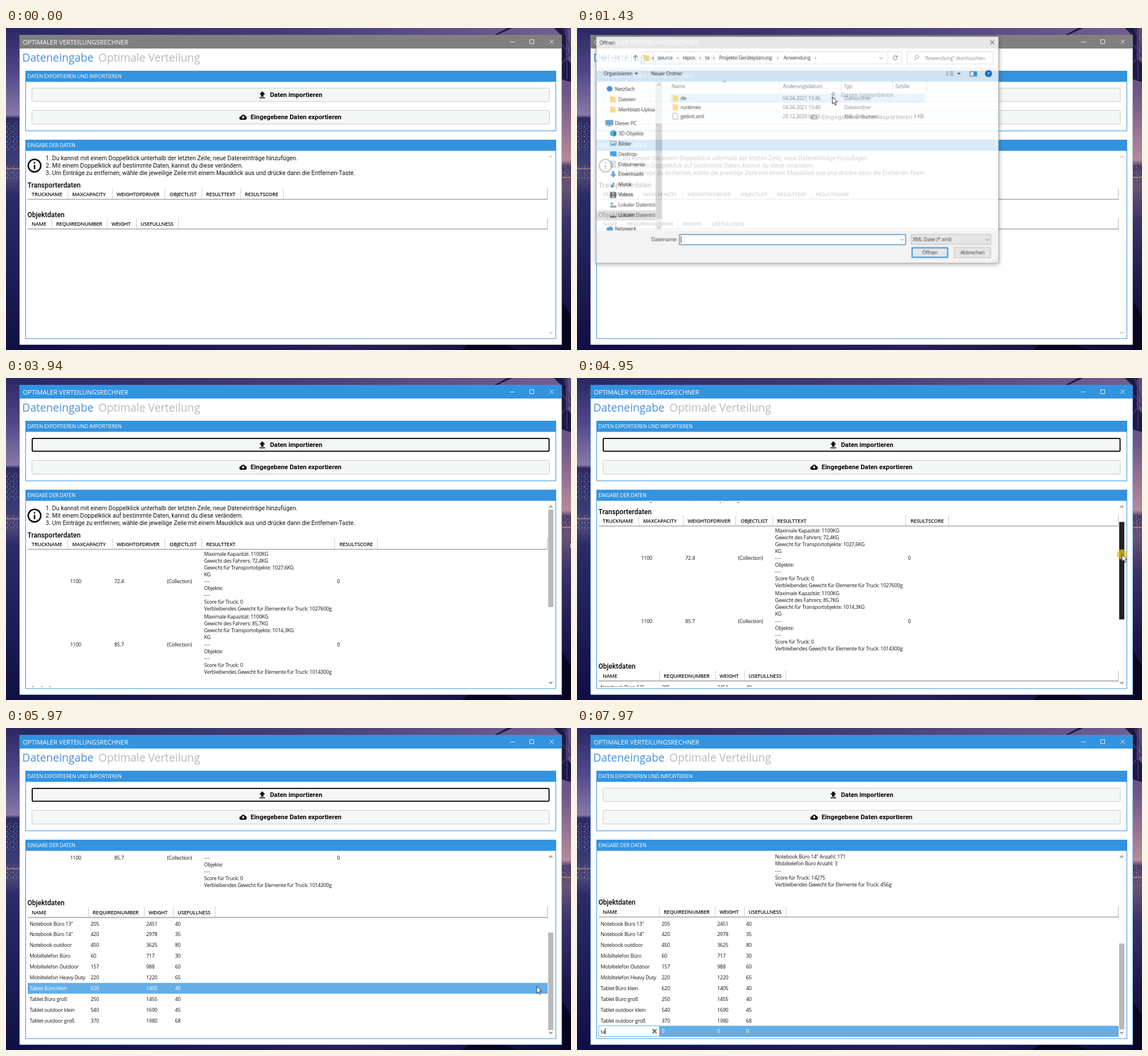
Animation, 991 px wide and 565 px high, one loop 8 s. Source, as an HTML page:

```html
<!DOCTYPE html>
<html lang="de">
<head>
<meta charset="utf-8">
<title>Optimaler Verteilungsrechner</title>
<style>
html, body { margin: 0; width: 100%; height: 100%; overflow: hidden; background: #14113f; }
svg { display: block; width: 991px; height: 565px; }
text { font: 8.9px "Open Sans", "Noto Sans", sans-serif; letter-spacing: -.2px; fill: #111; white-space: pre; }
text.app { font-size: 11.15px; letter-spacing: 0; fill: #fff; }
text.tab { font-size: 19.2px; letter-spacing: 0; fill: #4a90d9; }
text.off { fill: #b9b9b9; }
text.box { font-size: 9px; fill: #fff; }
text.btn { font: 700 11.3px Roboto, sans-serif; letter-spacing: 0; fill: #000; }
text.tip { font: 10.55px Roboto, sans-serif; letter-spacing: 0; fill: #111; }
text.cap { font: 500 12px Roboto, sans-serif; letter-spacing: 0; fill: #000; }
text.col { font-weight: 600; font-size: 9px; }
text.dash { letter-spacing: .6px; }
text.dim { fill: #6d6d6d; }
text.hdr { fill: #56677c; }
text.end { text-anchor: end; }
text.mid { text-anchor: middle; }
text.inv { fill: #fff; }
.ln { fill: none; stroke-width: 1; }

/* 8 s loop: 1 % = 80 ms */
.step { animation: 8s step-end infinite; }
.flow { animation: 8s linear infinite; }
.row rect { fill: #64aee8; opacity: 0; }
.row.hot rect { animation: hot 8s var(--at) infinite; }
.row.hot text { animation: lit 8s var(--at) infinite; }
@keyframes hot { 0%, 1.8% { opacity: 1 } 2.2%, 100% { opacity: 0 } }
@keyframes lit { 0%, 1.8% { fill: #fff } 2.2%, 100% { fill: #111 } }

@keyframes active { 0% { fill: #808080 } 10.875% { fill: #3393df } 13.875% { fill: #808080 } 39.4%, 100% { fill: #3393df } }
@keyframes press { 0% { fill: #f5f7f7 } 8.1% { fill: #e6e8e8 } 10.875% { fill: #d4d6d6 } 13.875% { fill: #e6e8e8 } 17%, 100% { fill: #f5f7f7 } }
@keyframes focus { 0% { opacity: 0 } 39.4% { opacity: 1 } 85.625%, 100% { opacity: 0 } }
@keyframes empty { 0% { opacity: 1 } 41.25%, 100% { opacity: 0 } }
@keyframes full { 0% { opacity: 0 } 41.25%, 100% { opacity: 1 } }
@keyframes trucks { 0% { opacity: 1 } 88%, 100% { opacity: 0 } }
@keyframes late { 0% { opacity: 0 } 88%, 100% { opacity: 1 } }
@keyframes nudge { 0% { transform: none } 88%, 100% { transform: translateY(-.8px) } }
@keyframes added { 0% { opacity: 0 } 85.625%, 100% { opacity: 1 } }
@keyframes arrows { 0% { fill: #dcdcdc } 41.25%, 100% { fill: #b0b0a8 } }
@keyframes scroll {
  0%, 59.375% { transform: translateY(0) } 66% { transform: translateY(-108px) }
  69.75%, 100% { transform: translateY(-240px) }
}
@keyframes thumb {
  0%, 41.24% { y: 231px; height: 171px; opacity: 0; fill: #b9b9b9 }
  41.25%, 52.5% { opacity: 1; fill: #b9b9b9 }
  53.75%, 59.37% { fill: #8c8c8c }
  59.375% { y: 231px; fill: #232323 }
  66% { y: 288px }
  69.7% { fill: #232323 }
  69.75% { y: 359px; fill: #b9b9b9 }
  85.62% { y: 359px; height: 171px }
  85.625%, 87.99% { y: 353px; height: 166px }
  88%, 100% { y: 378px; height: 151px; opacity: 1; fill: #b9b9b9 }
}
@keyframes dialog {
  0%, 16.125% { opacity: 0; transform: scale(.93) } 17.875% { opacity: .81; transform: scale(.989) }
  18.75%, 38.75% { opacity: 1; transform: none }
  40.75%, 100% { opacity: 0; transform: scale(.93) }
}
@keyframes hover { 0% { transform: none } 21.25% { transform: translateY(16px) } 23.75%, 100% { transform: translateY(32px) } }
@keyframes unpicked { 0% { opacity: 1 } 26.75%, 100% { opacity: 0 } }
@keyframes picked { 0% { opacity: 0 } 26.75%, 100% { opacity: 1 } }
@keyframes combo { 0% { fill: #e1e1e1; stroke: #adadad } 34.75% { fill: #e5f1fb; stroke: #0078d7 } 36.875%, 100% { fill: #e1e1e1; stroke: #adadad } }
@keyframes open { 0% { fill: #e1e1e1 } 36.875% { fill: #e5f1fb } 37.5%, 100% { fill: #cce4f7 } }
@keyframes cursor {
  0%, 2.74% { transform: translate(480px, 600px) }
  2.75% { transform: translate(470px, 437px) }
  5.625% { transform: translate(456px, 230px) }
  7.75% { transform: translate(449px, 102px) }
  9.125%, 19.4% { transform: translate(448px, 121px) }
  25.75%, 28.5% { transform: translate(430px, 156px); animation-timing-function: ease-in-out }
  35.2%, 36.125% { transform: translate(623px, 386px) }
  36.875%, 39% { transform: translate(624px, 392px); animation-timing-function: ease-in }
  45.375%, 49.25% { transform: translate(989.5px, 288px); animation-timing-function: ease-out }
  54%, 59.375% { transform: translate(956px, 288px) }
  66% { transform: translate(956px, 345px) }
  69.75% { transform: translate(956px, 416px) }
  71.25% { transform: translate(954px, 430px) }
  74.625% { transform: translate(931px, 453px) }
  75.625% { transform: translate(915px, 472px) }
  77.5% { transform: translate(840px, 524px) }
  79.125% { transform: translate(620px, 547px) }
  80% { transform: translate(480px, 543px) }
  82.25%, 87.99% { transform: translate(64px, 533px) }
  88%, 100% { transform: translate(480px, 600px) }
}
@keyframes click {
  0% { opacity: 0 } 10.875% { opacity: 1 } 12.4% { opacity: 0 } 26.75% { opacity: 1 } 27.875% { opacity: 0 }
  37.5% { opacity: 1 } 38.5% { opacity: 0 } 59.375% { opacity: 1 } 69.5% { opacity: 0 }
  85.625% { opacity: 1 } 86.25%, 100% { opacity: 0 }
}
@keyframes beam {
  0%, 87.99% { transform: translate(66px, 600px) }
  88%, 91.875% { transform: translate(66px, 534px) }
  94.25%, 96.75% { transform: translate(90px, 534px) }
  97.375%, 99.62% { transform: translate(86px, 534px) }
  99.625%, 100% { transform: translate(66px, 600px) }
}
@keyframes caret { 0% { transform: none } 96.75% { transform: translateX(3px) } 99.625%, 100% { transform: translateX(7.6px) } }
@keyframes typed1 { 0% { opacity: 0 } 96.75%, 100% { opacity: 1 } }
@keyframes typed2 { 0% { opacity: 0 } 99.625%, 100% { opacity: 1 } }
</style>
</head>
<body>
<svg viewBox="0 0 991 565">
  <defs>
    <linearGradient id="left" x2="0" y2="1">
      <stop offset="0" stop-color="#2a2763"/><stop offset=".14" stop-color="#51488a"/><stop offset=".27" stop-color="#8779a8"/>
      <stop offset=".28" stop-color="#2c2b62"/><stop offset=".4" stop-color="#3a3a74"/><stop offset=".47" stop-color="#4a4474"/><stop offset=".52" stop-color="#2b2b68"/><stop offset="1" stop-color="#100f44"/>
    </linearGradient>
    <linearGradient id="right" x2="0" y2="1">
      <stop offset="0" stop-color="#5a4a80"/><stop offset=".2" stop-color="#6d5686"/><stop offset=".41" stop-color="#b78a9c"/>
      <stop offset=".43" stop-color="#4a3a66"/><stop offset=".49" stop-color="#6a5474"/><stop offset=".6" stop-color="#3a3268"/><stop offset=".8" stop-color="#1c184c"/><stop offset="1" stop-color="#0b0a30"/>
    </linearGradient>
    <linearGradient id="sky">
      <stop offset="0" stop-color="#2a2763"/><stop offset=".5" stop-color="#463c78"/><stop offset="1" stop-color="#746092"/>
    </linearGradient>
    <linearGradient id="sea">
      <stop offset="0" stop-color="#100f44"/><stop offset=".6" stop-color="#281f56"/><stop offset="1" stop-color="#0b0a30"/>
    </linearGradient>
    <pattern id="lights" width="11" height="9" patternUnits="userSpaceOnUse">
      <path d="M1 2h2M6 5h1M8 1h1M3 7h1" stroke="#c9c4e0" stroke-width="1.2"/>
    </pattern>
    <clipPath id="view"><path d="M35 218.5H950.5V541.7H35z"/></clipPath>
    <clipPath id="tree"><path d="M30 92H134.5V357H30z"/></clipPath>
    <path id="folder" d="M0-5.5h4l1 1.5h4.5V5.5H0z" fill="#f8d36e"/>
  </defs>

  <!-- dusk skyline behind the window -->
  <rect width="991" height="14" fill="url(#sky)"/>
  <rect y="554" width="991" height="11" fill="url(#sea)"/>
  <rect width="26" height="565" fill="url(#left)"/>
  <rect x="973" width="18" height="565" fill="url(#right)"/>
  <path d="M0 166h24v50H0zM0 240h24v26H0zM975 244h16v26h-16z" fill="url(#lights)"/>
  <path d="M0 247h24M975 262h16" stroke="#e0a070" stroke-width="1.5" opacity=".7"/>
  <path d="M862 12 888 0h-9l-22 12zM925 0h36l14 14v76l16 5V62l-9-10V0z" fill="#1c1942"/>
  <path d="M978 0l13 42M984 0v90M975 28l16 22M975 62l16-18" stroke="#3f3562" stroke-width="2"/>
  <path d="M810 556h66l20 9h-96zM976 480l15 26v59h-15z" fill="#07061f"/>

  <!-- application window -->
  <rect class="step" style="animation-name:active" x="23.5" y="12" width="951.5" height="544"/>
  <path d="M24 36h950.5v519.5H24z" fill="#fff"/>
  <path class="ln" stroke="#fff" stroke-opacity=".85" d="M884 24.5h8M918.5 20.5h7v7h-7zM953.5 20.5l7 7M960.5 20.5l-7 7"/>
  <text class="app" x="29.5" y="28.6">OPTIMALER VERTEILUNGSRECHNER</text>
  <text class="tab" x="28.4" y="59">Dateneingabe</text>
  <text class="tab off" x="162" y="59">Optimale Verteilung</text>
  <g fill="#fff" stroke="#3393df"><path d="M34.5 75.5h930v105h-930zM34.5 196.5h930v348.5h-930z"/></g>
  <path fill="#3393df" d="M34 75h931v19.5H34zM34 196h931v19.5H34z"/>
  <text class="box" x="37.5" y="88.3">DATEN EXPORTIEREN UND IMPORTIEREN</text>
  <text class="box" x="37.5" y="209.3">EINGABE DER DATEN</text>
  <rect class="step" style="animation-name:press" x="45.5" y="105.5" width="907.5" height="23.5" rx="2" stroke="#c9cbcb"/>
  <rect x="45.5" y="144.5" width="907.5" height="24" rx="2" fill="#f5f7f7" stroke="#c9cbcb"/>
  <rect class="step" style="animation-name:focus" x="46" y="106" width="906.5" height="22.5" rx="2" fill="none" stroke="#111" stroke-width="2"/>
  <path d="M449.5 111l5 5.5h-2.8v4h-4.4v-4h-2.8zM444.5 121.7h10v1.6h-10z"/>
  <path d="M412.6 161a3 3 0 0 1-.4-6 4 4 0 0 1 7.4-.7 3.4 3.4 0 0 1-.2 6.7z"/>
  <path d="M415 154h1.9v2.4h1.7l-2.7 2.8-2.7-2.8h1.8z" fill="#fff"/>
  <text class="btn" x="463" y="121.2">Daten importieren</text>
  <text class="btn" x="429" y="160.4">Eingegebene Daten exportieren</text>

  <g clip-path="url(#view)">
    <g class="flow" style="animation-name:scroll">
      <circle cx="50" cy="241.5" r="11" fill="none" stroke="#0a0a0a" stroke-width="2.6"/>
      <path d="M48.7 235.5h2.6v2.5h-2.6zM48.7 240h2.6v7.5h-2.6z"/>
      <g id="tips"></g>
      <text class="cap" x="37.5" y="279.7">Transporterdaten</text>
      <g id="empty" class="step" style="animation-name:empty"></g>
      <g class="step" style="animation-name:full">
        <g id="fullHead"></g>
        <g id="trucks" class="step" style="animation-name:trucks"></g>
        <g id="late" class="step" style="animation-name:late"></g>
        <g id="objHead" class="step" style="animation-name:nudge"></g>
        <g id="objects"></g>
        <g class="step" style="animation-name:added">
          <path d="M38 762.5h912v19.5H38z" fill="#64aee8"/>
          <g id="zeros"></g>
        </g>
        <g class="step" style="animation-name:late">
          <path d="M38 762.5h106.5v19H38z" fill="#fff" stroke="#64aee8"/>
          <path d="M132.5 768.5l7 7M139.5 768.5l-7 7" stroke="#66665e" stroke-width="1.8"/>
          <text x="41.5" y="775.5" class="step" style="animation-name:typed1">t</text>
          <text x="44.5" y="775.5" class="step" style="animation-name:typed2">a</text>
          <path class="ln step" style="animation-name:caret" d="M42 766.5v11" stroke="#000"/>
        </g>
      </g>
    </g>
  </g>
  <path class="step" style="animation-name:arrows" d="M951 227.5l4.5-5 4.5 5zM951 533l4.5 5 4.5-5z"/>
  <rect class="flow" style="animation-name:thumb" x="951" width="9" y="231" height="171"/>

  <!-- file dialog -->
  <g class="flow" style="animation-name:dialog; transform-origin:386px 213px">
    <rect x="29.5" y="12.5" width="714" height="402" fill="#fff" stroke="#7d7d86" style="filter:drop-shadow(0 2px 5px rgba(0,0,0,.4))"/>
    <path d="M30 67.5h713V91H30z" fill="#f5f6f7"/>
    <path d="M30 357h713v57H30z" fill="#f0f0f0"/>
    <path class="ln" stroke="#222" d="M728.5 19.5l7 7M735.5 19.5l-7 7M99.5 55.5v-9M95.5 50l4-4 4 4"/>
    <path class="ln" stroke="#c4c4c4" d="M48 50.5h-8M43 47l-4 3.5 4 3.5M62 50.5h8M67 47l4 3.5-4 3.5M82 49.5l2 2 2-2"/>
    <path class="ln" stroke="#d9d9d9" d="M110.5 39.5h461.5v22H110.5zM546.5 40v22M581.5 39.5h152v22h-152z"/>
    <path class="ln" stroke="#444" d="M532 49.5l3 3 3-3M563 48.5a3.6 3.6 0 1 0 .6 2.5M563.5 46v2.7h-2.7"/>
    <path class="ln" stroke="#777" d="M598.8 51.5a2.9 2.9 0 1 1 .1 0M597.2 51l-3.7 4"/>
    <use href="#folder" x="114" y="50.5"/>
    <g id="path"></g>
    <path d="M98 77h6l-3 3.5zM670 77h6l-3 3.5z" fill="#333"/>
    <path class="ln" stroke="#777" d="M650.5 75.5h4M650.5 78.5h4M650.5 81.5h4M657 75.5h6M657 78.5h6M657 81.5h6"/>
    <path d="M692.5 75h12v8h-12z" fill="#fff" stroke="#555"/><path d="M699 75.5h5.5v7H699z" fill="#2b8fe0"/>
    <circle cx="725.5" cy="78.5" r="6.3" fill="#0f62b5"/>
    <text x="725.5" y="81.8" class="mid inv" style="font-weight:700">?</text>
    <g clip-path="url(#tree)"><path d="M30 321h105v18H30z" fill="#d9d9d9"/><g id="side"></g></g>
    <path d="M135 92h12v265h-12z" fill="#f0f0f0"/><path d="M135.5 167h11v169.5h-11z" fill="#cdcdcd"/>
    <path class="ln" stroke="#555" d="M138 99.5l3-3 3 3M138 349.5l3 3 3-3M255 94l2.5-2.5 2.5 2.5"/>
    <path class="ln" stroke="#e3e3e3" d="M355.5 91v19M464.5 91v19M555.5 91v19M615.5 91v19"/>
    <g class="step" style="animation-name:unpicked">
      <path class="step" style="animation-name:hover" d="M161 114.5h452V130H161z" fill="#e5f3ff"/>
    </g>
    <path class="step" style="animation-name:picked" d="M161.5 146.5h451v15.5h-451z" fill="#cce8ff" stroke="#99d1ff"/>
    <use href="#folder" x="165.5" y="122"/><use href="#folder" x="165.5" y="138"/>
    <path d="M166 149h6l2.5 2.5v8H166z" fill="#fff" stroke="#8b8b8b" stroke-width=".8"/>
    <g id="files"></g>
    <path d="M177.5 364h401v18h-401z" fill="#fff" stroke="#7a7a7a"/>
    <g class="step" style="animation-name:unpicked">
      <path class="ln" d="M177.5 364h401v18h-401z" stroke="#0078d7"/><path class="ln" d="M180.5 367v12" stroke="#000"/>
    </g>
    <text x="180" y="376.5" class="step" style="animation-name:picked">getinit.xml</text>
    <path class="step" style="animation-name:combo" d="M588.5 364h141v17.5h-141z"/>
    <path class="ln" stroke="#444" d="M569 371.5l3 3 3-3M720.5 371.5l3 3 3-3"/>
    <path class="step" style="animation-name:open" d="M590 387.5h63v17h-63z" stroke="#0078d7" stroke-width="2"/>
    <path d="M664.5 387h64.5v18h-64.5z" fill="#e1e1e1" stroke="#adadad"/>
    <path class="ln" stroke="#b5b5b5" stroke-dasharray="1 1.5" d="M734 412.5h7M737 410h4M739.5 407.5h2"/>
    <g id="labels"></g>
  </g>

  <!-- pointer -->
  <g class="flow" style="animation-name:cursor">
    <circle class="step" style="animation-name:click" r="9" fill="#e8c61c" fill-opacity=".75"/>
    <path d="M0 0V12.3l2.9-2.7 1.9 4.5 2.1-.9-1.9-4.4H9z" fill="#fff" stroke="#111" stroke-width=".9"/>
  </g>
  <path class="ln flow" style="animation-name:beam" d="M-2.5-6.5H2.5M0-6.5v13M-2.5 6.5H2.5" stroke="#111"/>
</svg>
<script>
const put = (id, parts) => { document.getElementById(id).innerHTML = parts.join(''); };
// y is the vertical middle of the line
const text = (x, y, s, cls = '') => `<text x="${x}" y="${y + 3.2}" class="${cls}">${s}</text>`;
const lines = (x, y, step, list, cls) => list.map((s, i) => text(x, y + i * step, s, s === '---' ? 'dash' : cls));

// table header: [label, x, separator]
const header = (y, cols) => cols.map(([s, x, sep]) => text(x, y, s, 'col') +
  `<path class="ln" stroke="#cfcfcf" d="M${sep + .5} ${y - 9.5}v18"/>`).join('') +
  `<path class="ln" stroke="#b4b4b4" d="M949.5 ${y - 9.5}v18"/><path d="M38 ${y + 8.3}h912v1.8H38z" fill="#b0b0b0"/>`;
const truckCols = (score, seps) => header(291.5, [['TRUCKNAME', 45, 108], ['MAXCAPACITY', 116, 186],
  ['WEIGHTOFDRIVER', 194, 278], ['OBJECTLIST', 287, 343], ['RESULTTEXT', 351, seps[0]], ['RESULTSCORE', score, seps[1]]]);

put('tips', lines(69.5, 228.8, 12.8, [
  '1. Du kannst mit einem Doppelklick unterhalb der letzten Zeile, neue Dateneinträge hinzufügen.',
  '2. Mit einem Doppelklick auf bestimmte Daten, kannst du diese verändern.',
  '3. Um Einträge zu entfernen, wähle die jeweilige Zeile mit einem Mausklick aus und drücke dann die Entfernen-Taste.'
], 'tip'));

put('empty', [truckCols(419, [411, 486]), text(37.5, 328.5, 'Objektdaten', 'cap'),
  header(343.5, [['NAME', 45, 80], ['REQUIREDNUMBER', 88, 177], ['WEIGHT', 185, 228], ['USEFULLNESS', 236, 302]])]);
put('fullHead', [truckCols(585, [576, 651])]);

const truck = (y, driver, load, rest) => [
  text(112.5, y, '1100'), text(190, y, driver), text(282.5, y, '(Collection)'), text(580.5, y, '0'),
  ...lines(347.5, y - 48.2, 12.06, ['Maximale Kapazität: 1100KG', `Gewicht des Fahrers: ${driver.replace('.', ',')}KG`,
    `Gewicht für Transportobjekte: ${load}KG`, 'KG', '---', 'Objekte:', '---', 'Score für Truck: 0',
    `Verbleibendes Gewicht für Elemente für Truck: ${rest}g`])];
put('trucks', [...truck(357, '72.4', '1027,6', 1027600), ...truck(467.3, '85.7', '1014,3', 1014300)]);
put('late', lines(347.5, 466.2, 12.06, ['Notebook Büro 14" Anzahl: 171', 'Mobiltelefon Büro Anzahl: 3', '---',
  'Score für Truck: 14275', 'Verbleibendes Gewicht für Elemente für Truck: 456g']));

put('objHead', [text(37.5, 547.5, 'Objektdaten', 'cap'),
  header(563.3, [['NAME', 45, 144], ['REQUIREDNUMBER', 152, 242], ['WEIGHT', 250, 293], ['USEFULLNESS', 301, 366]])]);
const colX = [41.5, 148.5, 246, 296.5];
const hoverAt = { 6: 5850, 7: 6000, 8: 6070, 9: 6130 };
put('objects', [
  ['Notebook Büro 13"', 205, 2451, 40], ['Notebook Büro 14"', 420, 2978, 35], ['Notebook outdoor', 450, 3625, 80],
  ['Mobiltelefon Büro', 60, 717, 30], ['Mobiltelefon Outdoor', 157, 988, 60], ['Mobiltelefon Heavy Duty', 220, 1220, 65],
  ['Tablet Büro klein', 620, 1405, 40], ['Tablet Büro groß', 250, 1455, 40], ['Tablet outdoor klein', 540, 1690, 45],
  ['Tablet outdoor groß', 370, 1980, 68]
].map((row, i) => {
  const y = 583.3 + i * 18.9;
  return `<g class="row ${hoverAt[i] ? 'hot' : ''}" style="--at:${hoverAt[i] || 0}ms">` +
    `<rect x="38" y="${y - 9.4}" width="912" height="18.9"/>${row.map((s, c) => text(colX[c], y, s)).join('')}</g>`;
}));
put('zeros', colX.slice(1).map(x => text(x, 772.2, '0', 'inv')));

put('path', [[128, '«'], [139, 'source'], [173, '›'], [183, 'repos'], [213, '›'], [223, 'te'], [237, '›'],
  [247.5, 'Projekte Geräteplanung'], [351, '›'], [362, 'Anwendung'], [417.5, '›']].map(([x, s]) => text(x, 50.8, s)));

const icon = {
  dot: '<circle r="5" cx="5" fill="#1a78cf"/>',
  folder: '<use href="#folder"/>',
  pc: '<path d="M-2-5h13v8H-2z" fill="#3a9be8" stroke="#666" stroke-width=".8"/><path d="M1 5h7" stroke="#777" stroke-width="1.5"/>',
  cube: '<path d="M0-3l5-2.5 6 2v7l-5 2-6-2z" fill="#27a3dc"/><path d="M6-1.5v7l5-2v-7z" fill="#0c5f9c"/>',
  image: '<path d="M0-4h11v8H0z" fill="#fff" stroke="#999"/><path d="M1.5 2.5V-.5l3 1 5-2v4z" fill="#4b94cf"/>',
  desk: '<path d="M0-4.5h11.5v9H0z" fill="#1487df"/><path d="M1 3.5h4" stroke="#fff"/>',
  page: '<path d="M1-5h8V5.5H1z" fill="#fff" stroke="#8299ad"/><path d="M3-2h4M3 .5h4M3 3h4" stroke="#4b94cf"/>',
  down: '<path d="M3.5-5.5h4V0H11L5.5 5.5 0 0h3.5z" fill="#2e8fdd"/>',
  note: '<path d="M5-5.5c0 3 4 2.5 3 6.5 0-2-1-2.5-2-2.5V3a2.3 2 0 1 1-1.3-1.8z" fill="#1c86dc"/>',
  film: '<path d="M0-5h10.5V5.5H0z" fill="#444"/><path d="M2.5-4h5.5v3.8H2.5zM2.5 1h5.5v3.5H2.5z" fill="#9fb6cc"/>',
  disk: '<path d="M0 1.5h11v3H0z" fill="#555"/><path d="M8 3h2" stroke="#8fe08f"/>',
  sys: '<path d="M1-4h4v3.5H1z" fill="#28a0e8"/><path d="M0 1.5h11v3H0z" fill="#777"/>',
  net: '<path d="M0-2l7-3 4 3v5L5 5 0 3z" fill="#4393d6"/>'
};
put('side', [['Netzfach', 'dot', 105.5, 1], ['Dateien', 'folder', 124], ['Merkblatt-Upload', 'folder', 142], ['Dieser PC', 'pc', 166.5, 1],
  ['3D-Objekte', 'cube', 184.5], ['Bilder', 'image', 202.7], ['Desktop', 'desk', 220.9], ['Dokumente', 'page', 239],
  ['Downloads', 'down', 257], ['Musik', 'note', 275.2], ['Videos', 'film', 293.4], ['Lokaler Datenträger', 'sys', 311.5],
  ['Lokaler Datenträger', 'disk', 329.7], ['Netzwerk', 'net', 354, 1]
].map(([s, pic, y, root]) => `<g transform="translate(${root ? 48.5 : 54.5} ${y})">${icon[pic]}</g>` + text(root ? 63 : 69, y, s)));

put('files', [
  ...[[163.5, 'Name'], [361, 'Änderungsdatum'], [469.5, 'Typ'], [560.5, 'Größe']].map(([x, s]) => text(x, 100.5, s, 'hdr')),
  ...[['de', '04.04.2021 13:46', 'Dateiordner'], ['runtimes', '04.04.2021 13:46', 'Dateiordner'], ['getinit.xml', '20.12.2020 00:15', 'XML-Dokument']]
    .map(([name, date, type], i) => {
      const y = 122.3 + i * 16;
      return text(179.5, y, name) + text(360.5, y, date, 'dim') + text(469.5, y, type, 'dim');
    }),
  text(610, 154.3, '3 KB', 'dim end')]);
put('labels', [text(35.5, 24, 'Öffnen'), text(43, 78.7, 'Organisieren'), text(127, 78.7, 'Neuer Ordner'),
  text(611.5, 50.8, '"Anwendung" durchsuchen', 'dim'), text(127.5, 373, 'Dateiname:'), text(591, 373, 'XML Datei (*.xml)'),
  text(621.5, 396, 'Öffnen', 'mid'), text(697, 396, 'Abbrechen', 'mid')]);
</script>
</body>
</html>
```
